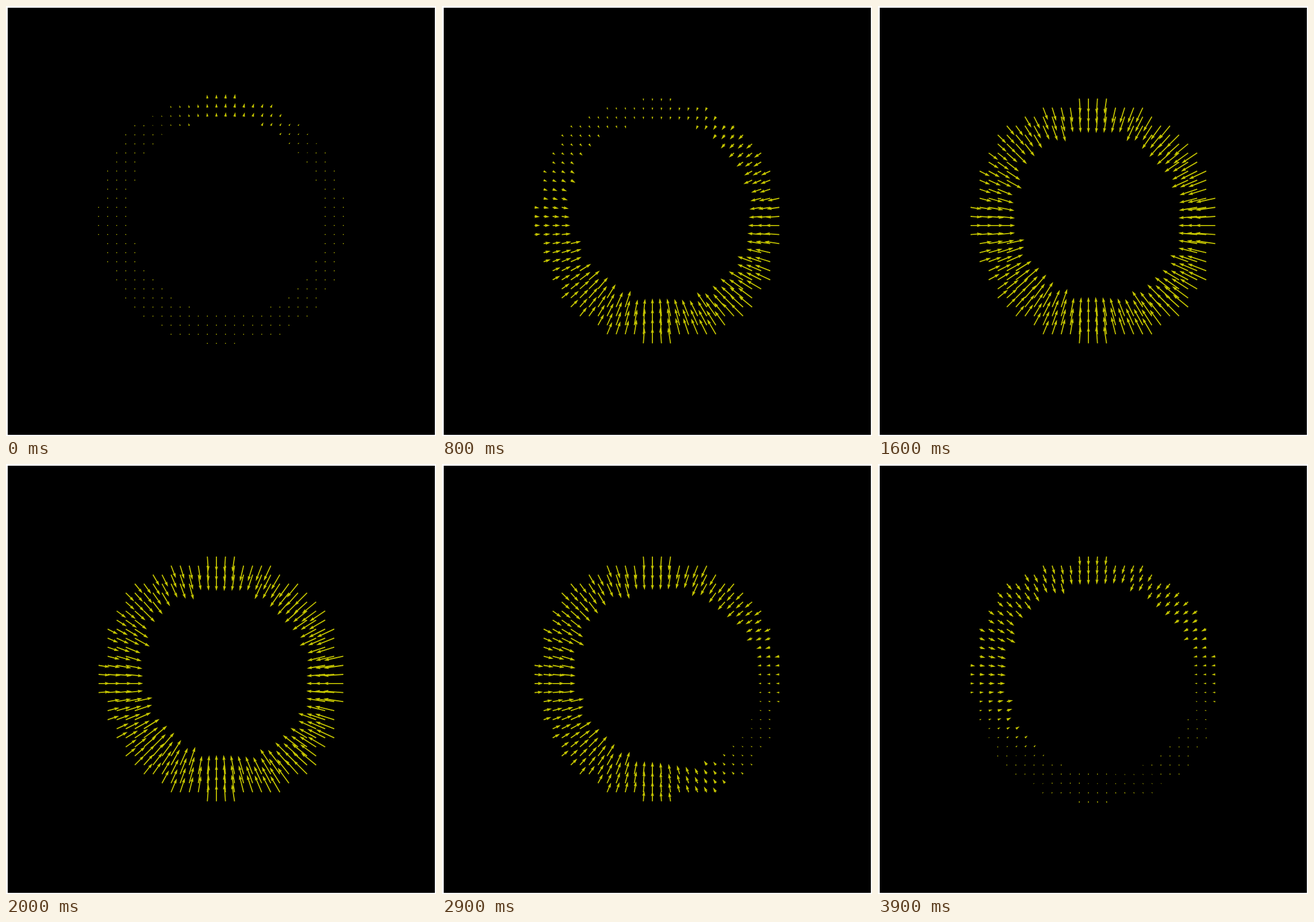
Write an HTML page with a canvas that moves like this. It is 748 px wide and 748 px high and loops after 4000 ms.

```html
<!DOCTYPE html>
<html lang="en">
<head>
<meta charset="utf-8">
<title>Vector ring</title>
<style>
  html, body { margin: 0; width: 100%; height: 100%; overflow: hidden; background: #fff; }
  canvas { display: block; }
</style>
</head>
<body>
<canvas id="stage" width="748" height="748"></canvas>
<script>
const ctx = document.getElementById('stage').getContext('2d');
const LOOP = 4000, STEP = 100;
const CELLS = 28, ORIGIN = 161, GAP = 15.77;
const CENTER = { col: 13, row: 14 };
const WIDTH = 1.8, HEAD = 5 * WIDTH, NOTCH = 4.5 * WIDTH;

const clamp = (v, lo, hi) => Math.max(lo, Math.min(hi, v));
const cosDeg = deg => Math.cos(deg * Math.PI / 180);
const ease = (t, from, duration) => {
  const u = clamp((t - from) / duration, 0, 1);
  return u * u * (3 - 2 * u);
};

// A disc that bulges slightly towards the top left and bottom right
function inDisc(col, row, cx, cy, radius) {
  const dx = col - cx, dy = row - cy, r = Math.hypot(dx, dy);
  const bulge = Math.max(0, 1.6 * dx * dy / (r * r || 1) - 0.28);
  return r <= radius + bulge;
}

function makePoint(col, row) {
  const x = ORIGIN + col * GAP, y = ORIGIN + row * GAP;
  const dx = col - CENTER.col, dy = row - CENTER.row;
  return {
    x, y,
    inward: Math.atan2(-dy, -dx),
    bearing: Math.atan2(dx, -dy) * 180 / Math.PI,   // clockwise from the top
    depth: clamp((190 - Math.hypot(x - 378, y - 370)) / 45, -0.5, 0.5)
  };
}

const points = [];
for (let row = 0; row < CELLS; row++) {
  for (let col = 0; col < CELLS; col++) {
    if (inDisc(col, row, 13.55, 13.5, 13.7) && !inDisc(col, row, 14.1, 13.05, 10.5)) {
      points.push(makePoint(col, row));
    }
  }
}

// Each direction squeezes and relaxes with its own delay and strength
function inwardLength({ bearing: a, depth }, t) {
  const squeeze = ease(t, 290 - 250 * cosDeg(a - 165), 900);
  const relax = ease(t, 2500 - 210 * cosDeg(a - 105) + 140 * cosDeg(2 * a), 800);
  const peak = 29.5 + 4.5 * cosDeg(a - 115);
  const rest = 7.5 + 10 * cosDeg(a + 15);
  const slope = (4 + 7 * cosDeg(a - 265)) * squeeze * (1 - 0.4 * relax);
  const swell = 8 * Math.exp(-(((a - 10) / 35) ** 2)) * (1 - ease(t, 500, 400));
  return peak * squeeze + (rest - peak) * relax + slope * depth - swell;
}

function trace(x, y, dir, shape) {
  const c = Math.cos(dir), s = Math.sin(dir);
  shape.forEach(([a, b], i) =>
    ctx[i ? 'lineTo' : 'moveTo'](x + a * c - b * s, y + a * s + b * c));
  ctx.closePath();
}

const dot = Array.from({ length: 6 }, (_, k) =>
  [WIDTH / 2 * cosDeg(60 * k), WIDTH / 2 * cosDeg(60 * k - 90)]);

function arrow(len) {
  const k = Math.min(1, len / HEAD), half = WIDTH / 2 * k;
  const neck = len - NOTCH * k, barb = len - HEAD * k;
  return [[0, -half], [neck, -half], [barb, -3 * half], [len, 0],
          [barb, 3 * half], [neck, half], [0, half]];
}

function draw(t) {
  ctx.fillStyle = '#fff';
  ctx.fillRect(0, 0, 748, 748);
  ctx.fillStyle = '#000';
  ctx.fillRect(3, 3, 743, 743);

  ctx.fillStyle = '#c4c400';
  ctx.beginPath();
  for (const p of points) {
    const len = inwardLength(p, t), size = Math.abs(len);
    const dir = len < 0 ? p.inward + Math.PI : p.inward;
    trace(p.x, p.y, dir, size < WIDTH ? dot : arrow(size));
  }
  ctx.fill();
}

const start = performance.now();
function tick() {
  const t = (performance.now() - start) % LOOP;
  draw(Math.floor(t / STEP) * STEP);
  requestAnimationFrame(tick);
}
tick();
</script>
</body>
</html>
```
